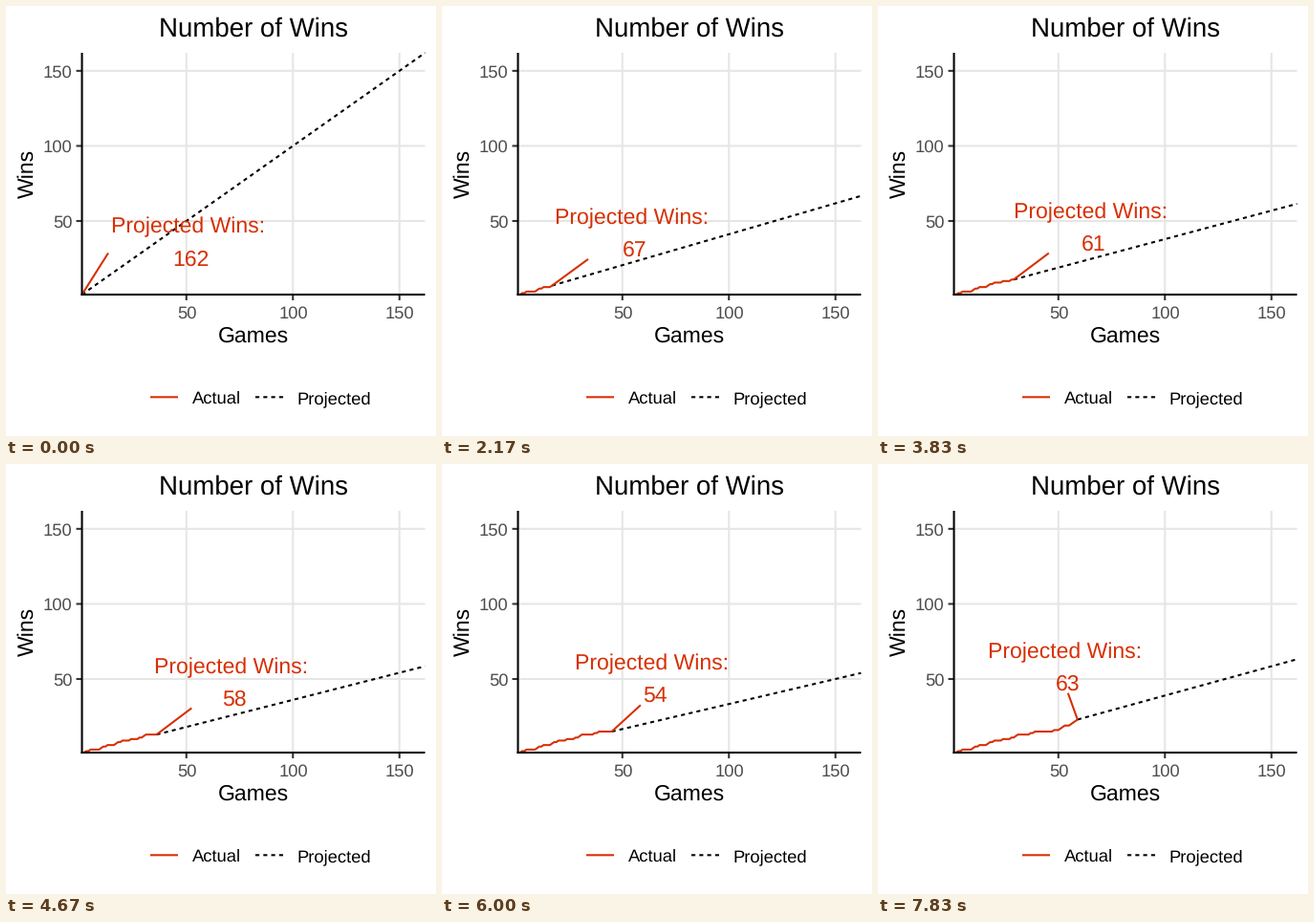
Recreate the animation shown at these times as a matplotlib script. Size 450 by 450 pixels, loop 8000 ms.

```python
import matplotlib.pyplot as plt
import numpy as np
from matplotlib.animation import FuncAnimation

SIZE, DPI = 450, 100
LOOP_MS, TICK_MS = 8000, 20
STEPS_PER_MS = 6 / 1000
RED = "#D73004"
LINE = 2.07
PX = 72 / DPI
GAMES_PER_STEP = 1.234
SEASON = 162
LEFT, RIGHT, TOP, BOTTOM = 79.5, 438.5, 49, 302

# Games that were won; the running total is the "Actual" line.
WON = [1, 3, 5, 10, 11, 13, 17, 18, 20, 24, 28, 30, 31, 37, 39,
       48, 51, 52, 53, 56, 57, 58, 59]
games = np.arange(1, 61)
wins = np.cumsum(np.isin(games, WON))

# Horizontal drift of the label's centre over the steps.
DRIFT_T = [0, 6, 13, 19, 21, 28, 35, 36, 42, 47]
DRIFT_X = [190.5, 193.5, 198, 208.5, 216.5, 235, 224.5, 219, 190.5, 195.5]


def px(game):
    return LEFT + (game - 1) * (RIGHT - LEFT) / (SEASON - 1)


def py(win):
    return BOTTOM - (win - 1) * (BOTTOM - TOP) / (SEASON - 1)


plt.rcParams["font.family"] = "Liberation Sans"
plt.rcParams["text.hinting"] = "none"
fig = plt.figure(figsize=(SIZE / DPI, SIZE / DPI), dpi=DPI, facecolor="white")
ax = fig.add_axes([0, 0, 1, 1])
ax.set_xlim(0, SIZE)
ax.set_ylim(SIZE, 0)
ax.axis("off")


def line(xs, ys, color, z=2, **kw):
    return ax.plot(xs, ys, color=color, lw=LINE * PX, zorder=z, snap=False,
                   solid_capstyle="butt", dash_capstyle="butt",
                   solid_joinstyle="round", **kw)[0]


def text(x, y, s, size, color="black", ha="center", **kw):
    return ax.text(x, y, s, fontsize=size * PX, color=color, ha=ha,
                   va="baseline", zorder=6, **kw)


for v in (50, 100, 150):
    x, y = px(v), py(v)
    line([x, x], [TOP, BOTTOM], "#E6E6E6", 1)
    line([LEFT, RIGHT], [y, y], "#E6E6E6", 1)
    line([x, x], [BOTTOM, BOTTOM + 6], "#333333")
    line([LEFT - 6, LEFT], [y, y], "#333333")
    text(x + 0.3, 326.5, str(v), 18.4, "#4D4D4D")
    text(69.5, y + 6.6, str(v), 18.4, "#4D4D4D", ha="right")

line([LEFT, LEFT], [TOP, BOTTOM + 1], "black", 5)
line([LEFT - 1, RIGHT], [BOTTOM, BOTTOM], "black", 5)

text(258.8, 32, "Number of Wins", 27.6)
text(259.2, 352, "Games", 23)
text(28.3, 175, "Wins", 23, rotation=90, rotation_mode="anchor")

DASH = (0, (2, 2))
line([151, 180], [409.3, 409.3], RED)
line([261, 290], [409.3, 409.3], "black", ls=DASH)
text(194.8, 416, "Actual", 18.4, ha="left")
text(304, 416, "Projected", 18.4, ha="left")

actual = line([], [], RED, 3)
projected = line([], [], "black", 3, ls=DASH)
leader = line([], [], RED, 4)
caption = text(0, 0, "Projected Wins:", 23, RED)
count = text(0, 0, "", 23, RED)


def leader_end(dx):
    """End of the leader relative to the label's centre."""
    if dx < -83:
        return -83.5, 11.5
    return np.interp(dx, [-82, -77, -40, 14], [-45, -40.3, -10, 3.5]), 27.3


def update(tick):
    # Near the end of each tick, so steps that fall inside it show in time.
    k = int((tick + 0.75) * TICK_MS * STEPS_PER_MS)
    game = round(1 + k * GAMES_PER_STEP)
    won = int(wins[game - 1])
    pace = won * SEASON / game
    x, y = px(game), py(won)
    cx, cy = np.interp(k, DRIFT_T, DRIFT_X), y - 55

    actual.set_data(px(games[:game]), py(wins[:game]))
    projected.set_data([x, RIGHT], [y, py(pace)])
    ex, ey = leader_end(x - cx)
    leader.set_data([x, cx + ex], [y, cy + ey])
    caption.set_position((cx + 0.5, cy - 9.4))
    count.set_position((cx + 3.4, cy + 24.5))
    count.set_text(str(round(pace)))
    return actual, projected, leader, caption, count


anim = FuncAnimation(fig, update, frames=LOOP_MS // TICK_MS, interval=TICK_MS,
                     init_func=lambda: update(0), repeat=True, repeat_delay=0)
plt.show()
```
